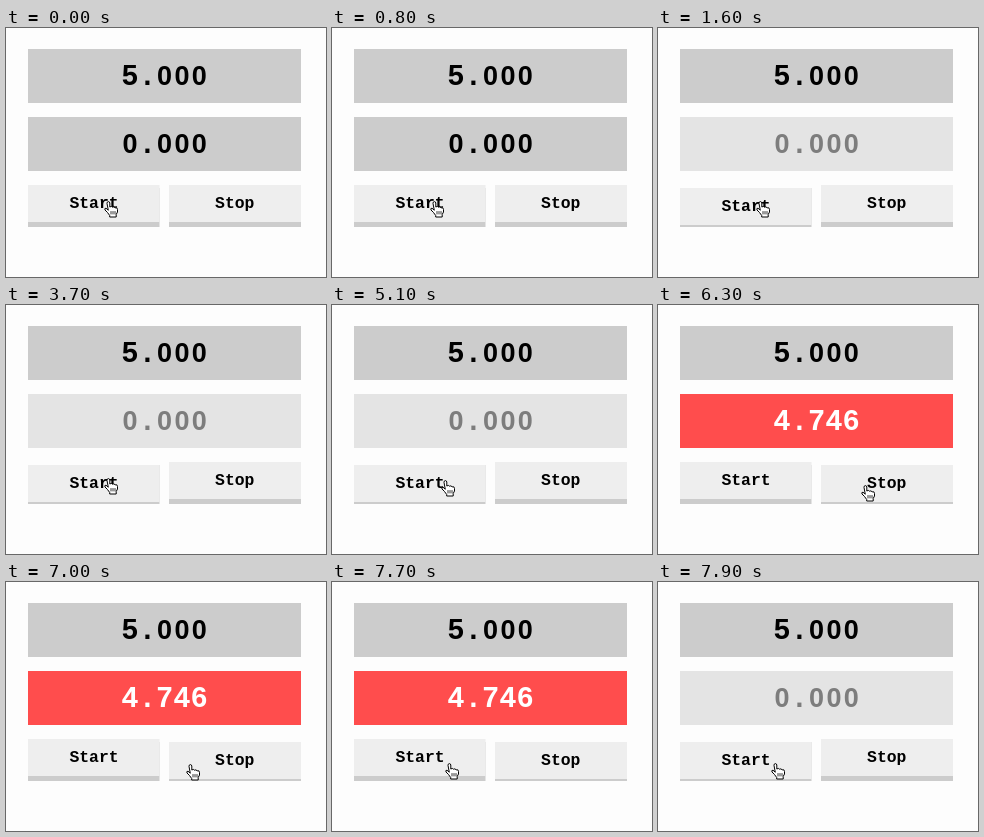
Recreate the animation shown at these times as an HTML page. Size 320 by 249 pixels, loop 8 s.

```html
<!DOCTYPE html>
<html lang="en">
<head>
<meta charset="utf-8">
<title>Timer</title>
<style>
  html, body { margin: 0; width: 100%; height: 100%; overflow: hidden; background: #fdfdfd; }
  svg { display: block; width: 100%; height: 100%; }
  text { font: bold 16.4px "Liberation Mono", "Courier New", monospace; text-anchor: middle; }
  .digits { font-size: 28.8px; }
  .zero { font: bold 27px "Liberation Sans", Arial, sans-serif; }
  .panel, .shade { fill: #ccc; }
  .face { fill: #eee; }
  .running { opacity: .5; }
  .late .panel { fill: #ff4d4d; }
  .late text { fill: #fff; }
</style>
</head>
<body>
<svg viewBox="0 0 320 249">
  <g><rect class="panel" x="22" y="21" width="273" height="54"/><text class="digits" id="goal" y="57"/></g>
  <g id="result"><rect class="panel" x="22" y="89" width="273" height="54"/><text class="digits" id="time" y="125"/></g>
  <g id="start">
    <rect class="shade" x="22" y="160" width="131.5" height="39"/>
    <g class="top"><rect class="face" x="22" y="157" width="131.5" height="37"/><text x="88" y="180">Start</text></g>
  </g>
  <g id="stop">
    <rect class="shade" x="163" y="160" width="132" height="39"/>
    <g class="top"><rect class="face" x="163" y="157" width="132" height="37"/><text x="228.8" y="180">Stop</text></g>
  </g>
  <g id="hand" stroke="#000" stroke-linejoin="round" stroke-linecap="round">
    <path fill="#fff" d="M3 2Q3 .6 4.3 .6T5.8 2V6Q7.5 4.7 8.5 6.2Q10 5.2 11.1 6.8Q13.4 6 13.5 8.5V11L12.2 13.5V16H5.7V14.5L3.5 11.5L1 9Q.2 7.2 2 7.2L4 9Z"/>
    <path fill="none" stroke-width=".8" d="M7 10.5V13M9 10.5V13M11 10.5V13"/>
  </g>
</svg>
<script>
  const LOOP = 8000;
  const STEP = 100;
  const byId = id => document.getElementById(id);

  const PHASES = [
    { at: 0, look: '', time: '0.000', down: '' },
    { at: 1600, look: 'running', time: '0.000', down: 'start' },
    { at: 6300, look: 'late', time: '4.746', down: 'stop' },
    { at: 7800, look: 'running', time: '0.000', down: 'start' }
  ];

  // Each move takes a number of steps along a path that sags in the middle
  const MOVES = [
    { at: 0, steps: 1, from: [98, 173], to: [98, 173], sag: 0 },
    { at: 5100, steps: 5, from: [98, 173], to: [203, 180], sag: 5 },
    { at: 7000, steps: 3, from: [203, 180], to: [113, 181], sag: 2 }
  ];

  const latest = (list, t) => list.findLast(item => item.at <= t);

  function pointerAt(t) {
    const { at, steps, from, to, sag } = latest(MOVES, t);
    const u = Math.min(1, (Math.floor((t - at) / STEP) + 1) / steps);
    const p = u * u * (3 - 2 * u);
    const mix = i => from[i] + (to[i] - from[i]) * p;
    return [mix(0), mix(1) + sag * Math.sin(Math.PI * p)].map(Math.round);
  }

  function setDigits(id, value) {
    byId(id).innerHTML = [...value].map((c, i) =>
      `<tspan x="${158.6 + (i - 2) * 17.3}"${c === '0' ? ' class="zero"' : ''}>${c}</tspan>`).join('');
  }

  function press(id, isDown) {
    document.querySelector(`#${id} .top`).setAttribute('transform', `translate(0 ${isDown ? 3 : 0})`);
  }

  let current;
  function draw(now) {
    const t = now % LOOP;
    const phase = latest(PHASES, t);
    if (phase !== current) {
      current = phase;
      byId('result').setAttribute('class', phase.look);
      setDigits('time', phase.time);
      for (const id of ['start', 'stop']) press(id, phase.down === id);
    }
    byId('hand').setAttribute('transform', `translate(${pointerAt(t)})`);
  }

  setDigits('goal', '5.000');
  const begin = performance.now();
  function tick() {
    draw(performance.now() - begin);
    requestAnimationFrame(tick);
  }
  tick();
</script>
</body>
</html>
```
